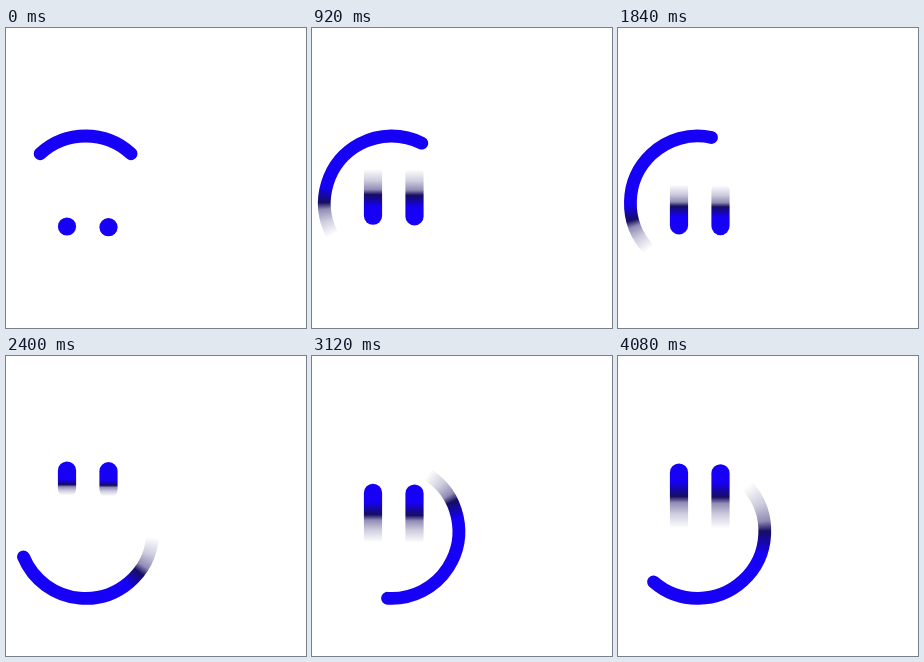
Write an HTML page with a canvas that moves like this. It is 300x300 px and loops after 4120 ms.

```html
<!DOCTYPE html>
<html lang="en">
<head>
<meta charset="utf-8">
<title>Spinning smile</title>
<style>
  html, body { margin: 0; width: 100%; height: 100%; overflow: hidden; background: #fff; }
  canvas { display: block; width: 100%; height: 100%; }
</style>
</head>
<body>
<canvas id="stage" width="300" height="300"></canvas>
<script>
const ctx = document.getElementById('stage').getContext('2d');
const LOOP = 4120, STEP = 40;
const BLUE = '#1600f6';
const dark = alpha => `rgba(10, 0, 90, ${alpha})`;
const rad = deg => deg * Math.PI / 180;

const mouth = { x: 79.6, y: 175.2, radius: 67.2, width: 12.8, span: 85.2 };
const eyes = { y: 156.5, swing: 42, radius: 9.1, places: [[61, 0], [102.5, 0.7]] };

// Degrees turned by the leading mouth end and by the eyes' swing.
const times      = [0, 520, 1320, 1840, 2400, 3120, 4080];
const mouthTurns = [-47.4, 147.5, 446, 642, 877.6, 1173.5, 1571];
const eyeTurns   = [-90, 68, 388, 617, 810, 1108, 1512];

function along(values, t) {
  let i = 0;
  while (i < times.length - 2 && t > times[i + 1]) i++;
  const k = (t - times[i]) / (times[i + 1] - times[i]);
  return values[i] + (values[i + 1] - values[i]) * k;
}

const eyeY = t => eyes.y - eyes.swing * Math.sin(rad(along(eyeTurns, t)));

// Solid blue, darkening, then thinning out; positions are fractions of the gradient.
function addFade(gradient, solid, black, end) {
  const stop = (at, color) => gradient.addColorStop(Math.min(1, Math.max(0, at)), color);
  const fade = k => black + (end - black) * k;
  stop(solid, BLUE);
  stop(black, dark(0.95));
  stop(fade(0.2), dark(0.45));
  stop(fade(0.55), dark(0.2));
  stop(end, dark(0));
}

function drawMouth(t, before) {
  const head = along(mouthTurns, t);
  const lag = head - along(mouthTurns, before);
  const length = mouth.span + lag;
  ctx.lineWidth = mouth.width;
  ctx.strokeStyle = BLUE;
  if (lag > 1) {
    const start = head - length - 20;
    const gradient = ctx.createConicGradient(rad(start), mouth.x, mouth.y);
    const at = back => (head - back - start) / 360;
    addFade(gradient, at(mouth.span + lag * 0.3), at(mouth.span + lag * 0.52), at(length));
    ctx.strokeStyle = gradient;
  }
  ctx.beginPath();
  ctx.arc(mouth.x, mouth.y, mouth.radius, rad(head - length), rad(head));
  ctx.stroke();
}

function drawEye(x, y, tail) {
  const lag = Math.abs(tail - y), dir = Math.sign(tail - y) || 1;
  const size = eyes.radius * 2, length = size + lag;
  ctx.lineWidth = size;
  ctx.strokeStyle = BLUE;
  if (lag > 1) {
    const from = y - dir * eyes.radius;
    const gradient = ctx.createLinearGradient(0, from, 0, from + dir * length);
    addFade(gradient, size / length, (size + lag * 0.28) / length, (size + lag * 0.88) / length);
    ctx.strokeStyle = gradient;
  }
  ctx.beginPath();
  ctx.moveTo(x, y);
  ctx.lineTo(x, lag > 1 ? tail : y + 0.01);
  ctx.stroke();
}

function render(t) {
  const trail = 160 + 53 * Math.max(0, (t - 3120) / 960);
  const before = Math.max(0, t - trail);
  ctx.fillStyle = '#fff';
  ctx.fillRect(0, 0, 300, 300);
  ctx.lineCap = 'round';
  drawMouth(t, before);
  for (const [x, drop] of eyes.places) drawEye(x, eyeY(t) + drop, eyeY(before) + drop);
}

const startTime = performance.now();
function tick() {
  const t = (performance.now() - startTime) % LOOP;
  render(Math.floor(t / STEP) * STEP);
  requestAnimationFrame(tick);
}
tick();
</script>
</body>
</html>
```
